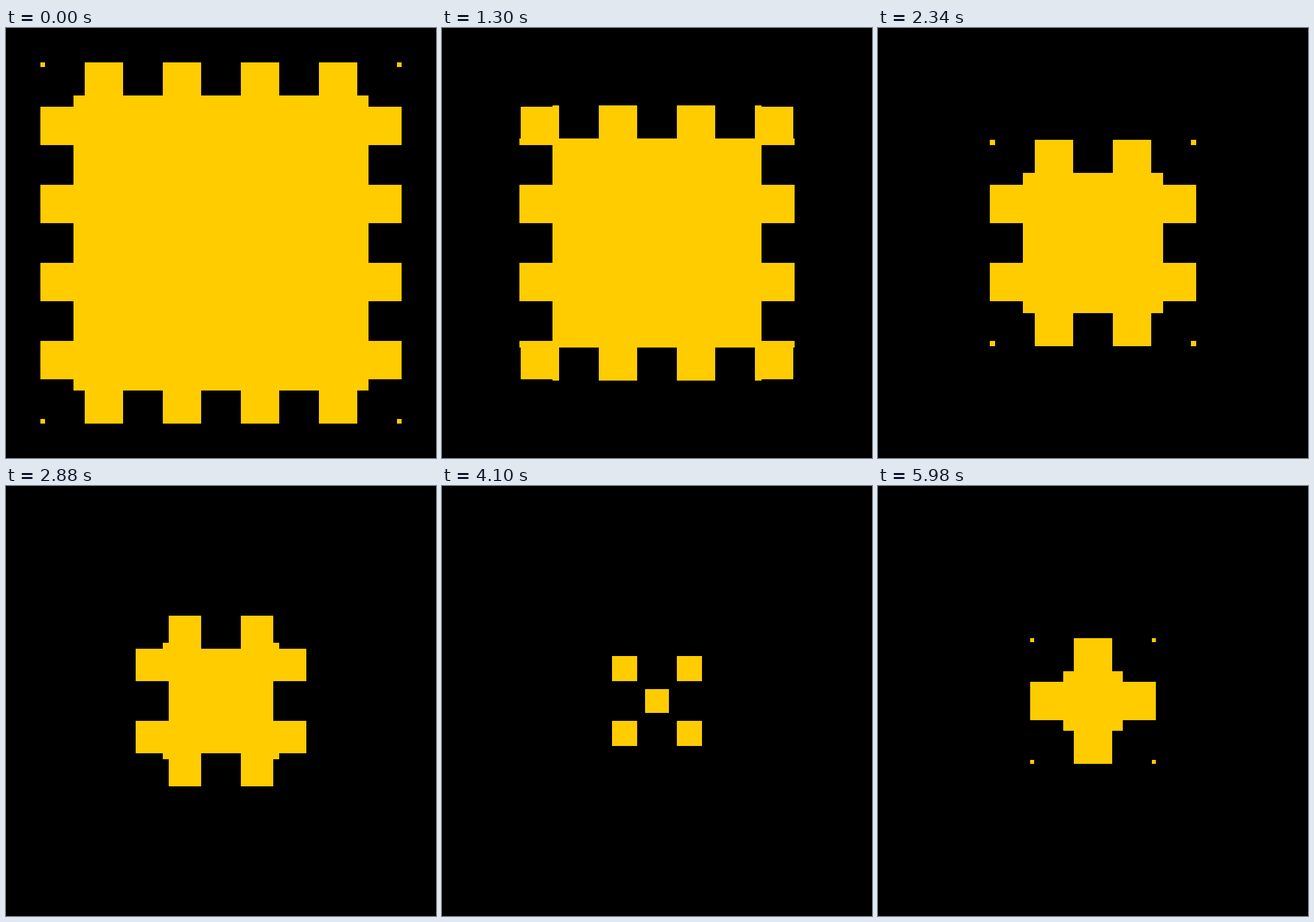
Write an HTML page with a canvas that moves like this. It is 650x650 px and loops after 6 s.

```html
<!DOCTYPE html>
<html lang="en">
<head>
<meta charset="utf-8">
<title>Closing teeth</title>
<style>
  html, body { margin: 0; width: 100%; height: 100%; overflow: hidden; background: #000; }
  canvas { display: block; }
</style>
</head>
<body>
<canvas id="stage" width="650" height="650"></canvas>
<script>
const SIZE = 650, BARS = 11, CELL = SIZE / BARS;
const LOOP = 6000, STEP = 20;
const ctx = document.getElementById('stage').getContext('2d');

// Odd bars run 50 steps ahead; every bar grows 1px per step, then retreats.
function barLength(i, step) {
  return i % 2 ? Math.min(102 + step, 529 - step) : Math.min(52 + step, 579 - step);
}

function draw(step) {
  ctx.fillStyle = '#ffcc00';
  ctx.fillRect(0, 0, SIZE, SIZE);
  ctx.fillStyle = '#000';
  for (let i = 0; i < BARS; i++) {
    const start = Math.floor(i * CELL);
    const width = Math.ceil((i + 1) * CELL) - start;
    const length = barLength(i, step);
    for (const edge of [0, SIZE - length]) {
      ctx.fillRect(start, edge, width, length);
      ctx.fillRect(edge, start, length, width);
    }
  }
}

function tick() {
  draw(Math.floor(performance.now() % LOOP / STEP));
  requestAnimationFrame(tick);
}
tick();
</script>
</body>
</html>
```
